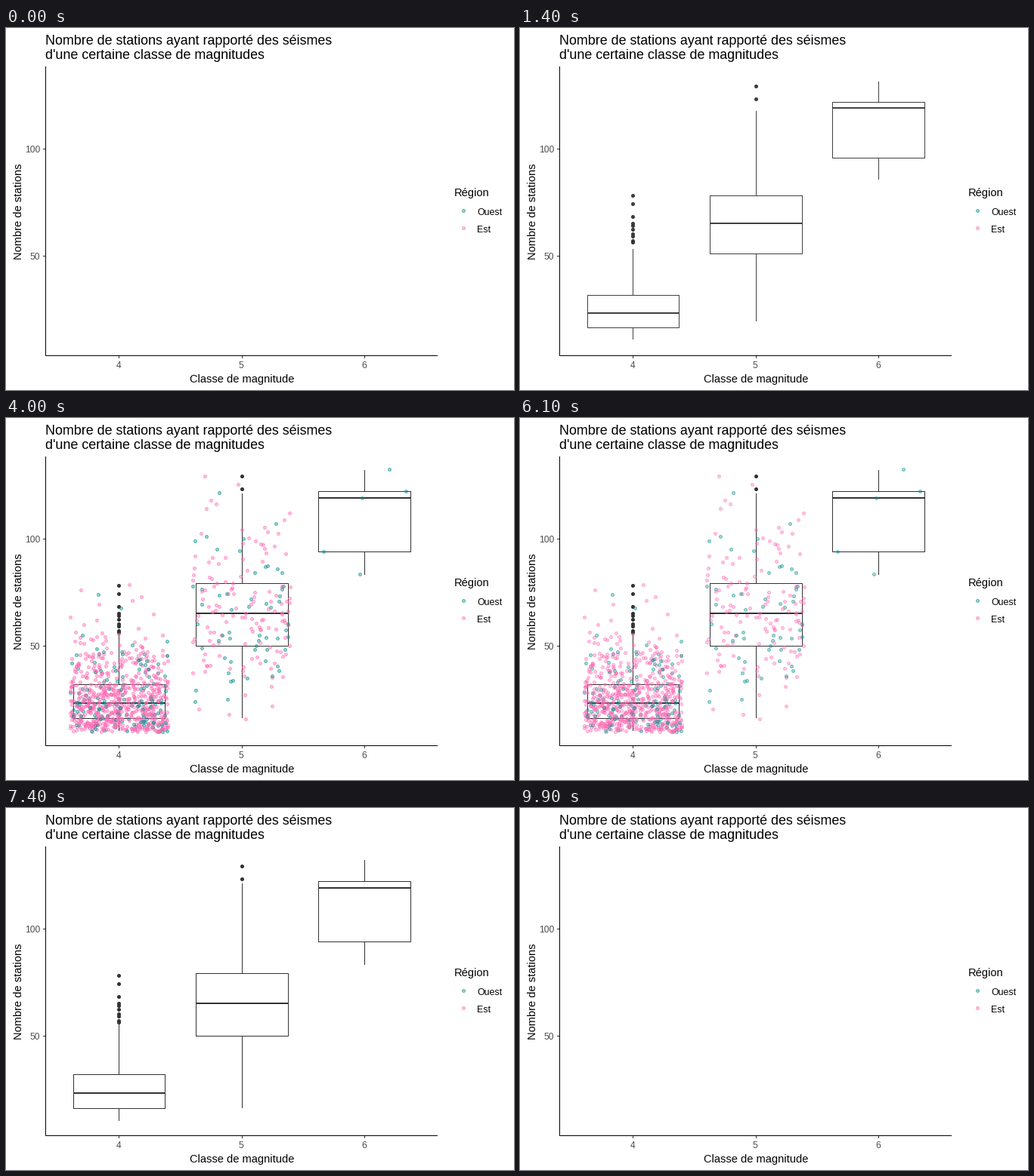
Animation of 672 by 480 pixels, one loop 10000 ms. Source, as a matplotlib script:

```python
import matplotlib.pyplot as plt
import numpy as np
from matplotlib.animation import FuncAnimation
from matplotlib.collections import LineCollection
from matplotlib.colors import to_rgba_array

W, H, DPI = 672, 480, 96
PX = 72 / DPI
DARK, TEAL, PINK = "#333333", "#008f8b", "#ff69b4"
FILL_ALPHA, RING_ALPHA = 0.4, 0.55
CENTERS = [149.9, 312.2, 474.5]
HALF_BOX, HALF_JITTER = 60.9, 65

# low whisker, lower hinge, median, upper hinge, high whisker
STATS = [(10, 16, 23, 32, 55), (16, 50, 65, 79, 121), (83, 94, 119, 122, 132)]
OUTLIERS = [(56, 57, 59, 60, 62, 64, 65, 68, 74, 78), (123, 129), ()]
# 5 %, 95 % and 98.5 % quantiles
TAILS = [(11, 47, 56), (34, 104, 118), (85, 130, 131)]
COUNTS = [802, 193, 5]
WEST_SHARE = [0.2, 0.3, 1]


def y_of(v):
    return 302 - (np.asarray(v, float) - 50) * 2.84


def mid(v):
    """Centre of the pixel that holds v."""
    return np.floor(v) + 0.5


fig = plt.figure(figsize=(W / DPI, H / DPI), dpi=DPI, facecolor="white")
ax = fig.add_axes([0, 0, 1, 1])
ax.set_xlim(0, W)
ax.set_ylim(H, 0)
ax.axis("off")


def label(x, y, s, size, color="black", **kw):
    kw.setdefault("va", "baseline")
    ax.text(x, y, s, fontsize=size * PX, color=color,
            family="Liberation Sans", **kw)


def lines(segments, color, width=1, z=1):
    lc = LineCollection(segments, colors=color, linewidths=width * PX,
                        capstyle="projecting", zorder=z)
    lc.set_snap(False)
    ax.add_collection(lc, autolim=False)
    return lc


def dots(x, y, colors, z):
    rgba = to_rgba_array(colors)
    return ax.scatter(x, y, s=(4 * PX) ** 2, facecolors=rgba,
                      edgecolors=rgba, linewidths=PX, zorder=z)


def fade(points, rgb, t):
    """Translucent discs whose ring is stronger than the fill."""
    ones = np.ones((len(rgb), 1))
    points.set_facecolor(np.hstack([rgb, ones * FILL_ALPHA * t]))
    points.set_edgecolor(np.hstack([rgb, ones * RING_ALPHA * t]))


def cloud(rng, k):
    """Jittered stations of class k that follow its quantiles."""
    lo, q1, m, q3, hi = STATS[k]
    p05, p95, p985 = TAILS[k]
    top = max((hi, *OUTLIERS[k]))
    n = COUNTS[k]
    v = np.interp(np.linspace(0, 1, n),
                  [0, .05, .25, .5, .75, .95, .985, 1],
                  [lo, p05, q1, m, q3, p95, p985, top])
    v = rng.permutation(np.round(v)) + rng.uniform(-0.4, 0.4, n)
    x = CENTERS[k] + rng.uniform(-HALF_JITTER, HALF_JITTER, n)
    hues = np.where(rng.random(n) < WEST_SHARE[k], TEAL, PINK)
    return mid(x), mid(y_of(v)), hues


# axes, titles and legend
label(52, 22, "Nombre de stations ayant rapporté des séismes", 17.88)
label(52, 41, "d'une certaine classe de magnitudes", 17.88)
label(312, 470, "Classe de magnitude", 14.67, ha="center")
label(24, 243, "Nombre de stations", 14.67, rotation=90, ha="right",
      va="center")
lines([[(52.5, 51.5), (52.5, 434.5), (570.5, 434.5)]], "black", z=2)
for v in (50, 100):
    y = mid(y_of(v))
    lines([[(49.5, y), (51.5, y)]], DARK)
    label(45, y + 4.5, str(v), 12, "#4d4d4d", ha="right")
for c, name in zip(CENTERS, "456"):
    lines([[(mid(c), 435.5), (mid(c), 437.5)]], DARK)
    label(c - 1.2, 451, name, 12, "#4d4d4d", ha="center")
label(593, 223, "Région", 14.67)
label(623.5, 248, "Ouest", 12.4)
label(623.5, 271, "Est", 12.4)
keys = [TEAL, PINK]
fade(dots([605.5] * 2, [242.5, 265.5], keys, 2), to_rgba_array(keys)[:, :3], 1)

# box plots
frames_lc = lines([], DARK, z=3)
median_lc = lines([], DARK, 2, z=3)
out_x = [mid(c) for c, vals in zip(CENTERS, OUTLIERS) for _ in vals]
out_y = mid(y_of([v for vals in OUTLIERS for v in vals]))
outliers = dots(out_x, out_y, [DARK] * len(out_x), 4)

# jittered stations
rng = np.random.default_rng(7)
sx, sy, hues = (np.concatenate(part)
                for part in zip(*(cloud(rng, k) for k in range(3))))
stations = dots(sx, sy, hues.tolist(), 5)
station_rgb = to_rgba_array(hues.tolist())[:, :3]


def ramp(i, start, end, steps=15):
    """Linear rise after start, linear fall before end."""
    return float(np.clip(min(i - start, end - i) / steps, 0, 1))


def draw_boxes(t):
    outline, medians = [], []
    for c, stats in zip(CENTERS, STATS):
        m = stats[2]
        lo, q1, _, q3, hi = mid(y_of([m + (v - m) * t for v in stats]))
        left, right, x = mid(c - HALF_BOX), mid(c + HALF_BOX), mid(c)
        outline += [[(x, lo - 1), (x, q1 + 1)], [(x, q3 - 1), (x, hi)],
                    [(left, q1), (left, q3), (right, q3), (right, q1),
                     (left, q1)]]
        y = np.floor(y_of(m))
        medians.append([(left + 1, y), (right - 1, y)])
    frames_lc.set_segments(outline)
    median_lc.set_segments(medians)
    for artist in (frames_lc, median_lc, outliers):
        artist.set_alpha(t)
        artist.set_visible(t > 0)


def draw_stations(t, full):
    radius, ring = (2.0, 1.0) if full else (0.65, 0.8)
    stations.set_sizes([(2 * radius * PX) ** 2])
    stations.set_linewidths([ring * PX])
    fade(stations, station_rgb, t)
    stations.set_visible(t > 0)


def update(i):
    draw_boxes(ramp(i, 0, 99))
    draw_stations(ramp(i, 25, 74), 35 <= i < 64)
    return frames_lc, median_lc, outliers, stations


anim = FuncAnimation(fig, update, frames=100, interval=100, repeat=True,
                     repeat_delay=0, blit=False)
plt.show()
```
